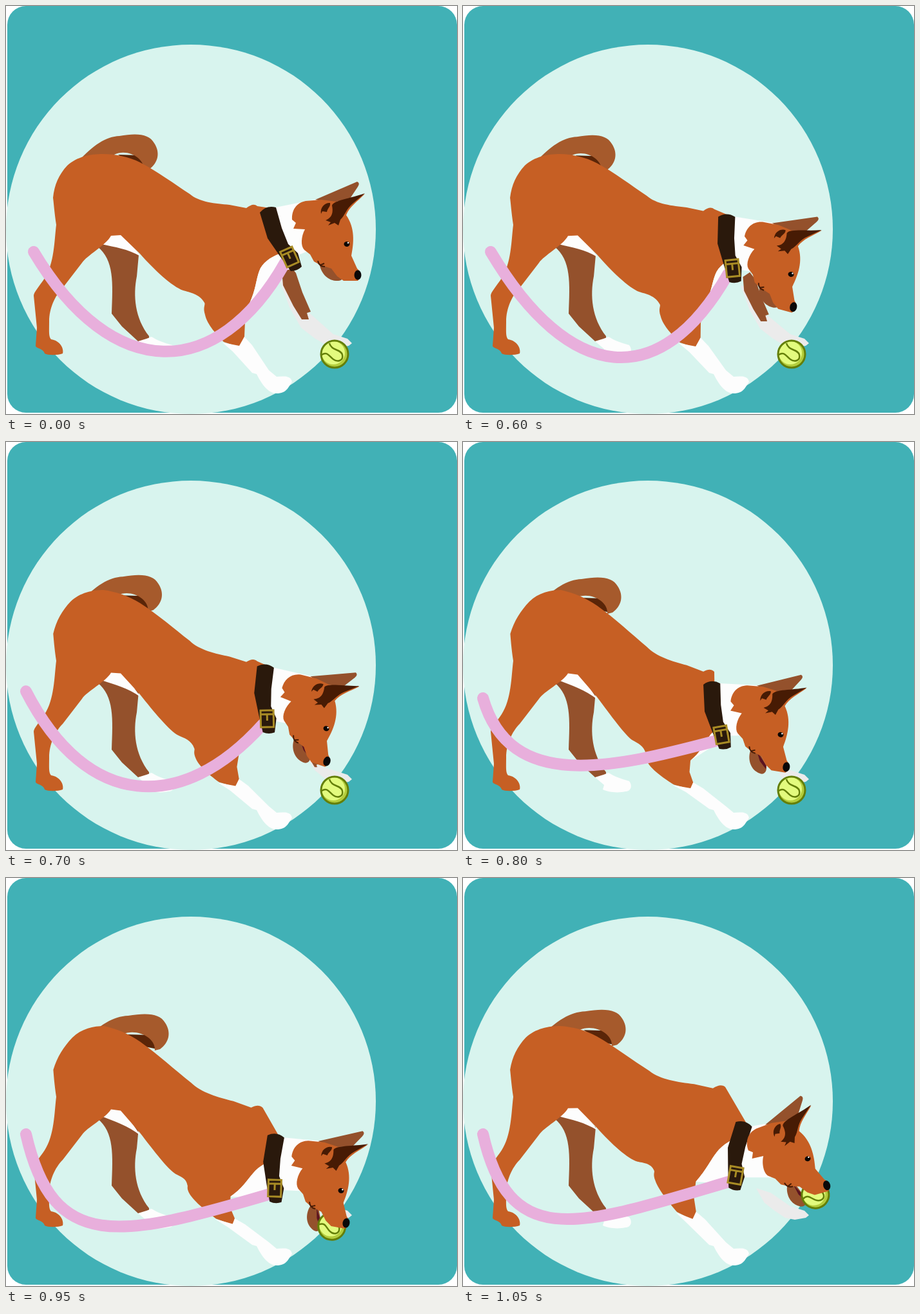
An HTML page with a canvas for the animation above (1.7 s loop, 700 px wide and 634 px high).

```html
<!DOCTYPE html>
<html lang="en">
<head>
<meta charset="utf-8">
<title>Dog fetching a ball</title>
<style>
html, body { margin: 0; width: 100%; height: 100%; overflow: hidden; background: #fff; }
canvas { display: block; }
</style>
</head>
<body>
<canvas id="stage" width="700" height="634"></canvas>
<script>
const ctx = document.getElementById('stage').getContext('2d');
const COAT = '#c65f24', SHADE = '#94512c', WHITE = '#fdfdfd', GREY = '#ebebeb', DARK = '#471b04';
const LOOP = 1700, START = 550, STEP = 50, LAST = 11;
const EYE = [530, 370], BUCKLE = [440, 390], LIP = [490, 402], BALL = [510, 541];

const ramp = (from, to, v) => Math.max(0, Math.min(1, (v - from) / (to - from)));
const ease = t => t * t * (3 - 2 * t);

// Everything is drawn standing; these amounts bend it into the pose of step k.
function poseAt(k) {
  const down = ramp(0, 6, k), nod = 1 - (1 - down) ** 2, swing = Math.sin(Math.PI * down);
  const snap = ramp(6, 9, k), lift = ramp(9, 11, k);
  return {
    crouch: ease(ramp(1, 6, k)) - .7 * lift,
    lunge: ramp(7, 11, k),
    head: [530 - 36 * nod + 27 * snap + 15 * lift,
      370 + 85 * nod + 31 * snap - 50 * lift,
      9.5 * nod + 11.5 * swing + snap - 26.5 * lift],
    collar: [440 - 39 * nod + 16 * snap + 6 * lift,
      390 + 65 * down ** 1.2 + 27 * snap - 20 * lift,
      14 * nod + 12 * swing + 12 * snap + 8 * lift],
    jaw: 36 * ramp(2, 9, k),
    held: k >= 9,
    tug: ramp(3, 4, k), tight: ramp(3, 6, k), snap
  };
}

// Moves every coordinate pair of a path.
const bend = (path, move) =>
  path.replace(/(-?[\d.]+) (-?[\d.]+)/g, (_, x, y) => move(+x, +y).join(' '));

// Shoulders sink and slide while rump and paws stay put.
const bodyBend = ({ crouch, lunge }) => (x, y) => {
  const front = ramp(250, 390, x), low = 1 - ramp(470, 560, y);
  const rump = 8 * (1 - ramp(100, 170, x)) * (1 - ramp(260, 300, y));
  const slide = -25 * ramp(230, 310, x) * ramp(370, 460, y) * low;
  const sink = 48 * ramp(150, 400, x) * (1 - ramp(430, 560, y));
  const tuck = -15 * ramp(200, 300, x) * (1 - ramp(320, 370, x)) * ramp(380, 470, y) * (1 - ramp(500, 560, y));
  const push = front * (17 - 27 * ramp(370, 460, y)) * low;
  return [x + crouch * (rump + slide) + lunge * push, y + crouch * sink + lunge * tuck];
};

const tailBend = ({ crouch, lunge }) => (x, y) => {
  const tip = .5 + .5 * ramp(120, 215, x);
  return [x + (10 * crouch + 14 * lunge) * tip, y + 11 * crouch + 2 * lunge];
};

const towardPaw = amount => (x, y) => [x + (490 - x) * amount, y + (515 - y) * amount];

const turned = ([x, y, deg], [px, py]) => (u, v) => {
  const r = deg * Math.PI / 180, c = Math.cos(r), s = Math.sin(r);
  return [x + (u - px) * c - (v - py) * s, y + (u - px) * s + (v - py) * c];
};

function posed([x, y, deg], [px, py], draw) {
  ctx.save();
  ctx.translate(x, y);
  ctx.rotate(deg * Math.PI / 180);
  ctx.translate(-px, -py);
  draw();
  ctx.restore();
}

function fill(path, color) {
  ctx.fillStyle = color;
  ctx.fill(new Path2D(path));
}

function line(path, color, width) {
  ctx.strokeStyle = color;
  ctx.lineWidth = width;
  ctx.stroke(new Path2D(path));
}

function oval(x, y, rx, ry, color) {
  ctx.beginPath();
  ctx.ellipse(x, y, rx, ry, 0, 0, 7);
  ctx.fillStyle = color;
  ctx.fill();
}

function drawScene() {
  ctx.fillStyle = '#fff';
  ctx.fillRect(0, 0, 700, 634);
  ctx.beginPath();
  ctx.roundRect(2, 0, 698, 632, 29);
  ctx.fillStyle = '#41b1b6';
  ctx.fill();
  oval(287, 347, 287, 287, '#d8f4ee');
}

function drawFarLegs(pose) {
  fill('M142 374C168 395 166 430 164 478L180 498 205 521 222 521 222 513C200 485 197 450 203 420L206 387 160 360Z', SHADE);
  fill('M205 521L218 517 226 514C235 520 245 523 258 527C264 535 260 543 252 543C240 546 225 544 217 540L219 533Z', WHITE);
  const leg = towardPaw(pose.crouch), shin = towardPaw(Math.max(pose.crouch, pose.lunge));
  fill(bend('M440 468L458 500 480 517', leg) + 'L500 528 515 531 532 528 537 524 530 517 508 510'
    + bend('L472 478Z', leg), GREY);
  fill(bend('M424 425L440 468 458 490 466 487 440 430Z', shin), GREY);
  fill(bend('M428 410L430 434 446 466 459 487 470 487 467 477 473 475 460 445 450 415 440 402Z', shin), SHADE);
}

function drawTail(pose) {
  const sway = tailBend(pose);
  fill(bend('M174 231L207 232 218 254 200 250Z', sway), '#5a2508');
  fill(bend('M112 242C135 216 155 203 176 202C204 197 222 199 230 213C240 228 236 244 222 254L214 256C216 236 188 221 168 231L150 250Z', sway), '#a65a2c');
}

function drawBody(pose, strap) {
  const move = bodyBend(pose);
  const chest = 'M425 385C410 390 397 400 393 412C388 425 388 440 378 462';
  const legs = 'L371 490 370 514 362 530 338 522C328 512 312 495 309 480C305 468 310 464 308 461'
    + 'C300 447 285 445 275 442C258 436 230 410 208 385L178 356 163 357C155 372 125 388 118 399'
    + 'L88 438C76 450 67 470 67 490C67 505 66 514 70 518C84 520 90 532 88 540C80 543 65 543 60 540'
    + 'C58 532 46 532 46 528L48 500 43 450C43 445 52 435 60 423C75 400 75 365 78 340';
  const back = 'C75 320 74 305 73 298C75 278 82 262 95 248C110 234 132 230 150 230C170 230 190 234 208 243'
    + 'C235 257 262 277 285 292C300 305 325 307 347 309L373 314C380 309 385 307 390 311';
  fill(bend('M148 370L163 350 178 350 209 389C188 377 170 375 148 370Z', move), WHITE);
  fill(bend(chest + legs + back, move) + `L${strap(410, 314)} ${strap(430, 380)}Z`, COAT);
  fill(bend('M370 514L362 528 336 523 352 537 382 570 389 572C398 590 408 602 420 602'
    + 'C436 602 438 592 444 584C442 574 432 575 420 576L408 566 382 527Z', move), WHITE);
  fill(bend(chest, move) + `L${strap(430, 412)} ${strap(448, 407)} ${strap(430, 380)}Z`, WHITE);
}

function drawLeash({ collar, tug, tight, snap }) {
  const x = 43 - 12 * tug, y = 382 + 16 * tight;
  const endX = collar[0] - 7, endY = collar[1] + 9;
  const near = [x + 122 - 80 * tight, y + 205 - 58 * tight + 38 * snap];
  const far = [endX - 105 - 57 * tight - 72 * snap, endY + 185 - 142 * tight + 26 * snap];
  ctx.lineCap = 'round';
  line(`M${x} ${y}C${near} ${far} ${endX} ${endY}`, '#e8afdc', 18);
  ctx.lineCap = 'butt';
}

function drawCollar() {
  fill('M394 321Q404 309 419 313L428 345 438 370 453 384 459 405Q452 412 442 412L426 390 406 361Z', '#2a190c');
  posed([440, 390, -24], [0, 0], () => {
    line('M-10 -13H10V13H-10ZM-10 -7H10M0 -7V3', '#a98c25', 3);
  });
}

function drawBall() {
  oval(0, 0, 21, 21, '#b3cc3c');
  oval(-2, -2, 18, 18, '#e3fb7e');
  line('M-20 1C-11 -5 -8 4 -2 8C5 13 14 10 12 1C10 -8 -5 -5 -8 -17', '#647f08', 2.5);
  ctx.beginPath();
  ctx.arc(0, 0, 21, 0, 7);
  ctx.lineWidth = 3;
  ctx.stroke();
}

function drawJaw() {
  fill('M487 402C488 412 497 426 512 427C526 428 526 418 520 411L498 397Z', SHADE);
  fill('M496 399L520 411 522 416 508 410Z', '#5b1420');
}

function drawHead() {
  fill('M480 301L545 273Q550 275 546 281L534 299 505 306Z', SHADE);
  fill('M465 303C450 306 443 318 444 332L450 337 446 346 464 347C458 358 457 373 463 379L472 386 478 397 487 402 505 408 514 420 524 427 546 427C551 422 552 414 545 408L536 388C540 368 542 345 528 325C533 312 545 304 557 292C540 298 525 302 512 304L490 301Z', COAT);
  fill('M557 291C535 299 508 302 506 310C509 325 503 330 496 333L504 336 500 341 510 337 516 341 519 332C526 326 528 315 538 307Z', DARK);
  fill('M489 323C487 312 496 305 503 306C504 312 499 314 498 320L491 319Z', DARK);
  line('M484 396Q486 405 495 405M487 403L494 400', DARK, 2);
  oval(529, 370, 4.5, 4, '#0c0603');
  oval(531, 368, 1.2, 1.2, '#fff');
  oval(546, 418, 5.5, 7.5, '#0b0808');
}

function draw(k) {
  const pose = poseAt(k), { head, collar } = pose;
  const face = turned(head, EYE), strap = turned(collar, BUCKLE);
  drawScene();
  drawFarLegs(pose);
  drawTail(pose);
  drawBody(pose, strap);
  fill(`M${strap(412, 314)}L${strap(418, 313)} ${face(484, 300)} ${face(480, 380)} ${face(466, 382)} ${strap(446, 390)}Z`, WHITE);
  drawLeash(pose);
  posed(collar, BUCKLE, drawCollar);
  posed(head, EYE, () => posed([...LIP, pose.jaw], LIP, drawJaw));
  posed(pose.held ? [...face(525, 427), head[2]] : [...BALL, 0], [0, 0], drawBall);
  posed(head, EYE, drawHead);
}

const begin = performance.now();
function frame() {
  const t = (performance.now() - begin) % LOOP;
  draw(Math.max(0, Math.min(LAST, Math.floor((t - START) / STEP) + 1)));
  requestAnimationFrame(frame);
}
frame();
</script>
</body>
</html>
```
